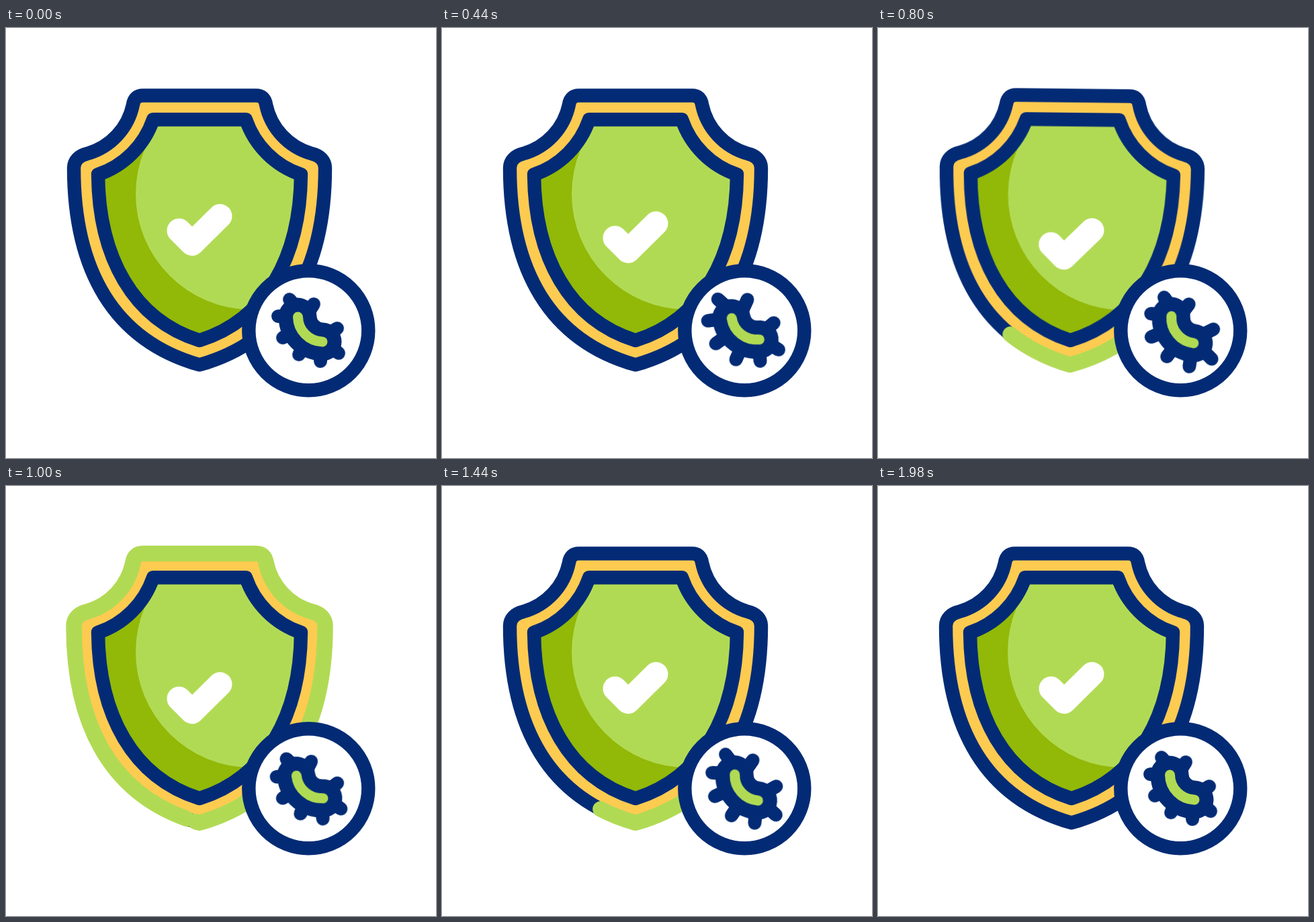
An HTML page without scripts for the animation above (2020 ms loop, 640 px wide and 640 px high).

```html
<!DOCTYPE html>
<html lang="en">
<head>
<meta charset="utf-8">
<title>Shield and germ</title>
<style>
  :root { --navy: #032b75; --gold: #fecb51; --lime: #b1da54; --moss: #92b808; }
  html, body { margin: 0; width: 100%; height: 100%; overflow: hidden; background: #fff; }
  svg { display: block; width: 100%; height: 100%; }
  path, circle { stroke-linecap: round; stroke-linejoin: round; }

  .shield, .tick, .germ, .leg path { animation: 2.02s cubic-bezier(.37, 0, .63, 1) infinite; }
  .shield { transform-origin: 288px 300px; animation-name: wobble; }
  .tick { animation-name: dip; }
  .germ { transform-origin: 447px 455px; animation-name: sway; }
  .leg path { fill: none; stroke: var(--navy); stroke-width: 20; }
  .a path { animation-name: legA; }
  .b path { animation-name: legB; }
  .c path { animation-name: legC; }

  .navy { stroke: var(--navy); stroke-width: 20.4; }
  .trace {
    fill: none; stroke: var(--lime); stroke-width: 23.5;
    animation: trace 2.02s linear infinite;
  }

  @keyframes wobble {
    0%, 38.6% { transform: rotate(0); }
    42.1% { transform: rotate(3deg); }
    45.5% { transform: rotate(-3deg); }
    49%, 100% { transform: rotate(0); }
  }
  @keyframes dip {
    0% { transform: translateY(0); }
    42.6% { transform: translateY(21px); }
    62%, 100% { transform: translateY(0); }
  }
  @keyframes sway {
    0%, 99%, 100% { transform: rotate(0); }
    18.8% { transform: rotate(-8.8deg); }
    36.6% { transform: rotate(6deg); }
    56.9% { transform: rotate(-9.5deg); }
    77.2% { transform: rotate(5.8deg); }
  }
  @keyframes legA {
    0%, 47.5%, 99%, 100% { transform: translateX(0); }
    20.8%, 63.4% { transform: translateX(6.3px); }
    39.6%, 81.2% { transform: translateX(1.3px); }
  }
  @keyframes legB {
    0%, 99%, 100% { transform: translateX(0); }
    21.8%, 62.4% { transform: translateX(3px); }
    38.6%, 80.2% { transform: translateX(6.4px); }
    49.5% { transform: translateX(1.3px); }
  }
  @keyframes legC {
    0%, 99%, 100% { transform: translateX(0); }
    23.8%, 64.4% { transform: translateX(7px); }
    39.6%, 81.2% { transform: translateX(5.2px); }
    49.5% { transform: translateX(1px); }
  }
  /* dash length and tail position, in hundredths of the outline */
  @keyframes trace {
    0%, 34.6% { stroke-dasharray: 0 100; stroke-dashoffset: 12.5; opacity: 0; }
    34.7% { stroke-dasharray: 0 100; stroke-dashoffset: 12.5; opacity: 1; }
    39.6% { stroke-dasharray: 18 82; stroke-dashoffset: 10.5; }
    44.5% { stroke-dasharray: 66 34; stroke-dashoffset: 5.5; }
    49% { stroke-dasharray: 100 0; stroke-dashoffset: -.5; }
    50.5% { stroke-dasharray: 97 3; stroke-dashoffset: -3.5; }
    56.4% { stroke-dasharray: 64 36; stroke-dashoffset: -36.5; }
    62.4% { stroke-dasharray: 34.9 65.1; stroke-dashoffset: -66; }
    71.3% { stroke-dasharray: 12 88; stroke-dashoffset: -92.5; }
    81.2% { stroke-dasharray: 1.5 98.5; stroke-dashoffset: -106; opacity: 1; }
    83.1% { stroke-dasharray: 0 100; stroke-dashoffset: -107.5; opacity: 1; }
    83.2%, 100% { stroke-dasharray: 0 100; stroke-dashoffset: -107.5; opacity: 0; }
  }
</style>
</head>
<body>
<svg viewBox="0 0 640 640">
  <defs>
    <path id="rim" pathLength="100" d="M288 501.300C160 465 101 360 101 208C101 198 108 190 121 187A96 96 0 0 0 189 114Q191 100.500 204 100.500H372Q385 100.500 387 114A96 96 0 0 0 455 187C468 190 475 198 475 208C475 360 416 465 288 501.300Z"/>
    <path id="face" d="M219 136.200H357A131 131 0 0 0 439 218C438 341 387 434 288 465C189 434 138 341 137 218A131 131 0 0 0 219 136.200Z"/>
    <clipPath id="inside"><use href="#face"/></clipPath>
  </defs>

  <g class="shield">
    <use href="#rim" class="navy" fill="var(--gold)"/>
    <use href="#rim" class="trace"/>
    <g clip-path="url(#inside)">
      <use href="#face" fill="var(--moss)"/>
      <circle cx="365" cy="247" r="172" fill="var(--lime)"/>
    </g>
    <use href="#face" class="navy" fill="none"/>
    <path class="tick" d="M257.500 301.500L277 321L318.500 280" fill="none" stroke="#fff" stroke-width="36"/>
  </g>

  <circle cx="450.300" cy="450.300" r="89" fill="#fff" stroke="var(--navy)" stroke-width="20.4"/>

  <g class="germ">
    <g class="leg a">
      <g transform="translate(422 404) rotate(230)"><path d="M-16 0H0"/></g>
      <g transform="translate(458 411) rotate(-58)"><path d="M-16 0H0"/></g>
      <g transform="translate(405 429) rotate(180)"><path d="M-16 0H0"/></g>
    </g>
    <g class="leg b">
      <g transform="translate(493 447) rotate(-32)"><path d="M-16 0H0"/></g>
      <g transform="translate(495 484) rotate(40)"><path d="M-16 0H0"/></g>
      <g transform="translate(468 496) rotate(93)"><path d="M-16 0H0"/></g>
    </g>
    <g class="leg c">
      <g transform="translate(436 486) rotate(122)"><path d="M-16 0H0"/></g>
      <g transform="translate(412 461) rotate(152)"><path d="M-16 0H0"/></g>
    </g>
    <g fill="none">
      <path d="M434 430A38 38 0 0 0 471 467" stroke="var(--navy)" stroke-width="57"/>
      <path d="M434.500 430A37.500 37.500 0 0 0 471 467" stroke="var(--lime)" stroke-width="15"/>
    </g>
  </g>
</svg>
</body>
</html>
```
